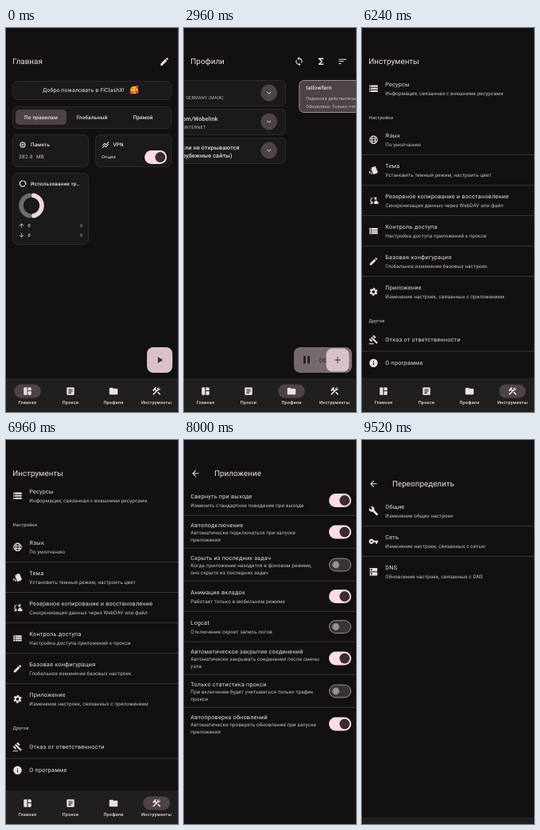
An HTML page that plays this animation: 216x480 px, repeating every 9600 ms.

```html
<!DOCTYPE html>
<html lang="ru">
<head>
<meta charset="utf-8">
<style>
html, body { margin: 0; width: 100%; height: 100%; overflow: hidden; background: #121011 }
svg { display: block; width: 100vw; height: 100vh }
text { font-family: Roboto, "Noto Sans", sans-serif; white-space: pre; text-rendering: geometricPrecision }
path { fill-rule: evenodd }
</style>
</head>
<body>
<svg id="stage" viewBox="0 0 216 480"></svg>
<script>
const BG = '#121011', INK = '#ece0e1', PINK = '#fbdde2', FAB = '#d9c2c7', DARK = '#3b2c30', PILL = '#4e4346';

// Icons on a 24 x 24 grid
const ICON = {
  edit: 'M3 17.25V21h3.75L17.81 9.94l-3.75-3.75zM20.71 7.04a1 1 0 0 0 0-1.41l-2.34-2.34a1 1 0 0 0-1.41 0l-1.83 1.83 3.75 3.75z',
  sync: 'M12 4V1L8 5l4 4V6c3.3 0 6 2.7 6 6 0 1-.25 2-.7 2.8l1.46 1.46A8 8 0 0 0 12 4zm0 14c-3.3 0-6-2.7-6-6 0-1 .25-2 .7-2.8L5.24 7.74A8 8 0 0 0 12 20v3l4-4-4-4z',
  sum: 'M18 4H6v2l6.5 6L6 18v2h12v-3h-7l5-5-5-5h7z',
  sort: 'M3 18h6v-2H3zM3 6v2h18V6zm0 7h12v-2H3z',
  home: 'M11 21H5a2 2 0 0 1-2-2V5a2 2 0 0 1 2-2h6zM13 21h6a2 2 0 0 0 2-2v-7h-8zM21 10V5a2 2 0 0 0-2-2h-6v7z',
  article: 'M19 3H5a2 2 0 0 0-2 2v14a2 2 0 0 0 2 2h14a2 2 0 0 0 2-2V5a2 2 0 0 0-2-2zm-5 14H7v-2h7zm3-4H7v-2h10zm0-4H7V7h10z',
  folder: 'M10 4H4a2 2 0 0 0-2 2v12a2 2 0 0 0 2 2h16a2 2 0 0 0 2-2V8a2 2 0 0 0-2-2h-8z',
  tools: 'M13.78 15.17l2.12-2.12 5.99 5.99-2.12 2.12zM17.5 10A3.5 3.5 0 0 0 20.6 4.9l-2.7 2.7-1.5-1.5 2.7-2.7A3.5 3.5 0 0 0 14.2 7.66l-1.85 1.85-1.78-1.78.71-.71-1.41-1.41L12 3.49a3 3 0 0 0-4.24 0L4.22 7.03l1.41 1.41H2.81l-.71.71 3.54 3.54.71-.71V9.15l1.41 1.41.71-.71 1.78 1.78-7.41 7.41 2.12 2.12L16.34 9.79c.36.13.75.21 1.16.21z',
  storage: 'M2 20h20v-4H2zm2-3h2v2H4zM2 4v4h20V4zm4 3H4V5h2zm-4 7h20v-4H2zm2-3h2v2H4z',
  cards: 'M2.5 19.65l1.4.56v-9l-2.5 5.83a2 2 0 0 0 1.1 2.6zM22 15.95L17.07 4a2 2 0 0 0-2.6-1.1L7.1 5.95a2 2 0 0 0-1.08 2.6l4.96 11.97a2 2 0 0 0 2.6 1.08l7.36-3.05a2 2 0 0 0 1.09-2.6zM7.88 8.75a1 1 0 1 1 0-2 1 1 0 0 1 0 2zm-2 11a2 2 0 0 0 2 2h1.45l-3.45-8.34z',
  cloud: 'M21.5 15A3.5 3.5 0 0 0 14.7 14.25 3 3 0 0 0 14.9 20h6.6a2.5 2.5 0 0 0 0-5zM10 4.26v2.1A6 6 0 0 0 8 16.44V14h2v6H4v-2h2.73A8 8 0 0 1 10 4.26zM20 6h-2.73a8 8 0 0 1 2.66 5h-2A6 6 0 0 0 16 7.56V10h-2V4h6z',
  list: 'M2 14h4v-4H2zm0 5h4v-4H2zM2 9h4V5H2zm5 5h15v-4H7zm0 5h15v-4H7zM7 5v4h15V5z',
  gavel: 'M1 21h12v2H1zM5.24 8.07l2.83-2.83 14.14 14.14-2.83 2.83zM12.32 1l5.66 5.66-2.83 2.83-5.66-5.66zM3.83 9.48l5.66 5.66-2.83 2.83L1 12.31z',
  info: 'M12 2a10 10 0 1 0 0 20 10 10 0 0 0 0-20zm1 15h-2v-6h2zm0-8h-2V7h2z',
  wrench: 'M22.7 19l-9.1-9.1c.9-2.3.4-5-1.5-6.9-2-2-5-2.4-7.4-1.3L9 6 6 9 1.6 4.7C.4 7.1.9 10.1 2.9 12.1c1.9 1.9 4.6 2.4 6.9 1.5l9.1 9.1c.4.4 1 .4 1.4 0l2.3-2.3c.5-.4.5-1.1.1-1.4z',
  key: 'M12.65 10a6 6 0 1 0 0 4H17v4h4v-4h2v-4zM7 14a2 2 0 1 1 0-4 2 2 0 0 1 0 4z',
  dns: 'M3 13h18v8H3zM7 19a2 2 0 1 1 0-4 2 2 0 0 1 0 4zM3 3h18v8H3zM7 9a2 2 0 1 1 0-4 2 2 0 0 1 0 4z',
  back: 'M20 11H7.83l5.59-5.59L12 4l-8 8 8 8 1.41-1.41L7.83 13H20z',
  chip: 'M15 9H9v6h6zm-2 4h-2v-2h2zm8-2V9h-2V7a2 2 0 0 0-2-2h-2V3h-2v2h-2V3H9v2H7a2 2 0 0 0-2 2v2H3v2h2v2H3v2h2v2a2 2 0 0 0 2 2h2v2h2v-2h2v2h2v-2h2a2 2 0 0 0 2-2v-2h2v-2h-2v-2zm-4 6H7V7h10z',
  chart: 'M2 20l7.5-7.5 4 4 7.1-8L22 9.9l-8.5 9.6-4-4-6 6zM3.5 15.5l6-6 4 4L22 3.9l-1.4-1.4-7.1 8-4-4L2 14z',
  usage: 'M13 2v3.1a7 7 0 0 1 5.5 9.5l2.6 1.5A10 10 0 0 0 13 2zM12 19a7 7 0 0 1-1-13.9V2a10 10 0 1 0 9.1 15.9l-2.6-1.5A7 7 0 0 1 12 19z',
  play: 'M8 5v14l11-7z',
  plus: 'M19 13h-6v6h-2v-6H5v-2h6V5h2v6h6z',
  dots: 'M10 4h4v4h-4zM10 10h4v4h-4zM10 16h4v4h-4z',
  up: 'M11 20V7.8l-5.6 5.6L4 12l8-8 8 8-1.4 1.4L13 7.8V20z',
  down: 'M13 4v12.2l5.6-5.6L20 12l-8 8-8-8 1.4-1.4 5.6 5.6V4z'
};
const DRAWN = {
  globe: '<g fill="none" stroke="#ece0e1" stroke-width="2"><circle cx="12" cy="12" r="9"/><ellipse cx="12" cy="12" rx="4" ry="9"/><path d="M4 9h16M4 15h16"/></g>',
  gear: '<g fill="none" stroke="#ece0e1"><circle cx="12" cy="12" r="5.4" stroke-width="3.8"/><circle cx="12" cy="12" r="8.2" stroke-width="3" stroke-dasharray="4.4 4.19" stroke-dashoffset="-2.1"/></g>'
};

// Markup helpers; y is the middle of the shape or text
const icon = (name, x, y, size = 12.6, fill = INK) =>
  `<g transform="translate(${x} ${y}) scale(${size / 24}) translate(-12 -12)">${DRAWN[name] || `<path d="${ICON[name]}" fill="${fill}"/>`}</g>`;
const text = (x, y, size, str, opt = '', gap = .02) =>
  `<text x="${x}" y="${y + size * .35}" font-size="${size}" letter-spacing="${gap * size}" fill="${INK}" ${opt}>${str}</text>`;
const rect = (x, y, w, h, r, fill, opt = '') =>
  `<rect x="${x}" y="${y}" width="${w}" height="${h}" rx="${r}" fill="${fill}" ${opt}/>`;
const circle = (x, y, r, fill, opt = '') => `<circle cx="${x}" cy="${y}" r="${r}" fill="${fill}" ${opt}/>`;
const group = (id, body, opt = '') => `<g id="${id}" ${opt}>${body}</g>`;
const card = (y, h, x = 8.5, w = 199) => rect(x, y + .5, w, h - 1, 6, '#1b191a', 'stroke="#343032" stroke-width=".8"');
const line = y => rect(0, y - .9, 216, .8, 0, '#433d3f');
const MID = 'text-anchor="middle"', END = 'text-anchor="end"', BOLD = 'font-weight="500"';
const heading = (x, str) => text(x, 41.5, 9.9, str, '', 0);
const title = (x, y, str) => text(x, y, 7.25, str, '', .03);
const sub = (x, y, str) => text(x, y, 6.3, str, 'fill-opacity=".85"', .017);
const toggle = (x, y, on) => on
  ? rect(x - 14, y - 8.4, 28, 16.8, 8.4, PINK) + circle(x + 5.7, y, 6.4, DARK)
  : rect(x - 13.5, y - 7.9, 27, 15.8, 7.9, '#383335', 'stroke="#9a8f91"') + circle(x - 5.3, y, 4.4, '#9a8f91');

const heart = (x, y) => `<path transform="translate(${x} ${y})" d="M0 2C-4 -1-1-3 0-1 1-3 4-1 0 2z" fill="#e8354a"/>`;
const smiley = circle(161, 77.5, 4.8, '#f9b93a') +
  '<path d="M157.8 76.6q1-1.4 2 0M162 76.6q1-1.4 2 0M158.6 79q2.4 2.6 4.8 0" fill="none" stroke="#5c3518" stroke-width=".8"/>' +
  heart(157.2, 81) + heart(164.8, 80.4) + heart(164.6, 73.6);

const arc = (x, y, r, from, sweep) => {
  const at = a => `${x + r * Math.cos(a)} ${y + r * Math.sin(a)}`;
  return `M${at(from)}A${r} ${r} 0 ${sweep > Math.PI ? 1 : 0} 1 ${at(from + sweep)}`;
};
const ring = (from, color) =>
  `<path d="${arc(32, 222, 13, from, 2.75)}" fill="none" stroke="${color}" stroke-width="5.6" stroke-linecap="round"/>`;
const traffic = (y, dir) => icon(dir, 19.5, y, 8) + text(27.5, y, 5.6, '0', BOLD) + text(96.5, y, 5.6, 'B', END + ' fill-opacity=".6"');

const home = card(66, 24) + text(46, 77.5, 7, 'Добро пожаловать в FlClashX!', '', .015) + smiley +
  card(98, 28) + rect(12, 102, 64, 19, 5, PILL) +
  [['По правилам', 44], ['Глобальный', 108], ['Прямой', 172]].map(([s, x]) => text(x, 111.5, 6.5, s, `${MID} ${BOLD}`)).join('') +
  card(133, 41, 8.5, 95) + icon('chip', 21, 146, 10.5) + text(31, 146, 6.4, 'Память', BOLD) + text(16, 160.5, 6.4, '382.8  MB', 'fill-opacity=".85"', .06) +
  card(133, 41, 112.5, 95) + icon('chart', 125, 146, 10.5) + text(134.5, 146, 6.4, 'VPN', BOLD) + text(120, 161.5, 5.6, 'Опции', '', .035) + toggle(188, 161.5, true) +
  card(181, 90, 8.5, 95) + icon('usage', 21, 194.5, 10.5) + text(31, 194.5, 6.4, 'Использование тр…', BOLD) +
  ring(-1.38, '#f0d8dd') + ring(1.76, '#6f6a6b') + traffic(247, 'up') + traffic(259, 'down');

const chevron = y => circle(186.5, y, 10.4, PILL) +
  `<path d="M184.2 ${y - 1.1}l2.3 2.3 2.3-2.3" fill="none" stroke="${INK}"/>`;
const right = (x, y, str) => text(x, y, 7.2, str, `${END} ${BOLD}`);
const small = (x, y, str) => text(x, y, 5.5, str, `${END} fill-opacity=".8"`, .035);
const proxies = [65, 101, 137].map(y => card(y, 33) + chevron(y + 16)).join('') +
  right(45, 77, 'Прокси') + small(129.5, 87, 'Selector  GERMANY (MAIN)') +
  right(122.5, 113, 'Chatroom/Wobelink') + small(107, 124, 'Selector  INTERNET') +
  right(149.5, 149, 'Режим (если не открываются') + right(140.5, 159.5, 'некоторые зарубежные сайты)');

const profiles = rect(8.5, 65.5, 199, 40, 6, PILL, 'stroke="#a69799" stroke-width=".9"') +
  text(17, 74.5, 6.9, 'tallowfern', BOLD) +
  text(17, 88, 5.4, 'Подписка действительна до: 05.08.2025', 'fill-opacity=".85"', .035) +
  text(17, 97.8, 5.4, '', 'id="updated" fill-opacity=".85"', .035) +
  group('more', icon('dots', 188.5, 86)) +
  '<path id="spin" fill="none" stroke="#f2dce0" stroke-width="2.4"/>';

const row = (y, pic, name, note) => icon(pic, 14.5, y + 18.8, 12.6) + title(29.3, y + 13.7, name) + sub(29.3, y + 24.9, note);
const label = (y, str) => text(8.5, y, 5.8, str, 'fill-opacity=".75" ' + BOLD, .02);
const rows = (top, list) => list.map((r, i) => row(top + 38 * i, ...r) + (i ? line(top + 38 * i) : '')).join('');
const toolList = label(-34, 'Ещё') +
  rows(-25, [
    ['article', 'Запросы', 'Просмотр последних записей запросов'],
    ['list', 'Соединения', 'Просмотр текущих данных о соединениях'],
    ['storage', 'Ресурсы', 'Информация, связанная с внешними ресурсами']]) +
  label(106, 'Настройки') +
  rows(115, [
    ['globe', 'Язык', 'По умолчанию'],
    ['cards', 'Тема', 'Установить темный режим, настроить цвет'],
    ['cloud', 'Резервное копирование и восстановление', 'Синхронизация данных через WebDAV или файл'],
    ['list', 'Контроль доступа', 'Настройка доступа приложений к прокси'],
    ['edit', 'Базовая конфигурация', 'Глобальное изменение базовых настроек'],
    ['gear', 'Приложение', 'Изменение настроек, связанных с приложением']]) +
  label(360, 'Другое') +
  icon('gavel', 14.5, 383.5) + title(29.3, 383.5, 'Отказ от ответственности') + line(398.5) +
  icon('info', 14.5, 412.8) + title(29.3, 412.8, 'О программе');

const options = [
  [1, 'Свернуть при выходе', 'Изменить стандартное поведение при выходе'],
  [1, 'Автоподключение', 'Автоматически подключаться при запуске', 'приложения'],
  [0, 'Скрыть из последних задач', 'Когда приложение находится в фоновом режиме,', 'оно скрыто из последних задач'],
  [1, 'Анимация вкладок', 'Работает только в мобильном режиме'],
  [0, 'Logcat', 'Отключение скроет запись логов'],
  [1, 'Автоматическое закрытие соединений', 'Автоматически закрывать соединения после смены', 'узла'],
  [0, 'Только статистика прокси', 'При включении будет учитываться только трафик', 'прокси'],
  [1, 'Автопроверка обновлений', 'Автоматически проверять обновления при запуске', 'приложения']];
let optionTop = 56.7;
const optionList = options.map(([on, name, a, b], i) => {
  const y = optionTop, h = b ? 41 : 38;
  optionTop += h;
  return (i ? line(y) : '') + title(8.3, y + (b ? 11.3 : 14), name) +
    sub(8.3, y + (b ? 20.7 : 25.3), a) + (b ? sub(8.3, y + 30.1, b) : '') + toggle(196, y + h / 2 - .2, on);
}).join('');

const subpage = (id, name, body) =>
  `<clipPath id="${id}Clip"><rect id="${id}Box" width="216"/></clipPath>` +
  group(id, rect(0, 0, 216, 480, 0, BG) + group(id + 'Body', icon('back', 14.5, 41.8) + heading(38, name) + body), `clip-path="url(#${id}Clip)"`);

const tabs = [['home', 'Главная'], ['article', 'Прокси'], ['folder', 'Профили'], ['tools', 'Инструменты']];
const nav = rect(0, 438, 216, 42, 0, '#211e20') + tabs.map(([pic, name], i) => {
  const x = 27 + 54 * i;
  return group('pill' + i, rect(-16.8, -8.4, 33.6, 16.8, 8.4, PILL)) + icon(pic, x, 454, 12.6) +
    text(x, 468, 5.5, name, `${MID} ${BOLD}`, .04);
}).join('');

const stage = document.getElementById('stage');
stage.innerHTML = rect(0, 0, 216, 480, 0, BG) +
  '<clipPath id="body"><rect y="58" width="216" height="380"/></clipPath><g clip-path="url(#body)">' +
  group('pages', [home, proxies, profiles, group('toolList', toolList)].map((p, i) => `<g transform="translate(${216 * i})">${p}</g>`).join('')) + '</g>' +
  tabs.map(([, name], i) => group('head' + i, heading(8.3, name) +
    (i == 0 ? icon('edit', 199, 42, 13) : i == 2 ? icon('sync', 144.5, 41.8) + icon('sum', 172, 41.8) + icon('sort', 199, 41.8) : ''))).join('') +
  circle(144.5, 42, 9.5, INK, 'id="ripple"') +
  group('runFab', rect(0, 399, 32, 32, 8, FAB, 'id="runBox"') +
    group('playIcon', icon('play', 193, 415, 14, DARK)) +
    group('runInfo', rect(150, 410, 2.8, 9.5, .3, DARK) + rect(155.2, 410, 2.8, 9.5, .3, DARK) +
      text(170, 415, 7.5, '', `id="clock" style="fill:${DARK}"`, .067))) +
  group('addFab', rect(-14.4, -14.4, 28.8, 28.8, 7.5, FAB) + icon('plus', 0, 0, 12.6, DARK)) +
  nav + subpage('app', 'Приложение', optionList) +
  subpage('override', 'Переопределить', rows(57, [
    ['wrench', 'Общие', 'Изменение общих настроек'],
    ['key', 'Сеть', 'Изменение настроек, связанных с сетью'],
    ['dns', 'DNS', 'Обновление настроек, связанных с DNS']]));

const $ = id => document.getElementById(id);
const set = (id, attrs) => { for (const k in attrs) $(id).setAttribute(k, attrs[k]); };
const show = (id, on) => set(id, { opacity: +on });
const span = (t, start, len) => Math.min(1, Math.max(0, (t - start) / len));
const bezier = (x1, y1, x2, y2) => x => {
  const f = (a, b, u) => 3 * a * u * (1 - u) ** 2 + 3 * b * u * u * (1 - u) + u ** 3;
  let lo = 0, hi = 1;
  for (let i = 0; i < 24; i++) {
    const m = (lo + hi) / 2;
    if (f(x1, x2, m) < x) lo = m; else hi = m;
  }
  return f(y1, y2, lo);
};
const easeOut = bezier(0, 0, .58, 1), fastSlow = bezier(.4, 0, .2, 1);

// Grows a list row into a full page
function expand(id, rowTop, rowEnd, p, fade) {
  const y = rowTop * (1 - p);
  set(id, { visibility: p > 0 ? 'visible' : 'hidden', opacity: fade });
  set(id + 'Box', { y, height: rowEnd + (480 - rowEnd) * p - y });
  set(id + 'Body', { transform: `translate(0 ${y})` });
}

function draw(t) {
  const pos = 2 * easeOut(span(t, 2811, 300)) + easeOut(span(t, 5530, 300));
  set('pages', { transform: `translate(${-216 * pos})` });
  const scroll = 1 - (1 - span(t, 5960, 450)) ** 3;
  set('toolList', { transform: `translate(0 ${112 * (1 - scroll)})` });

  const tab = t < 2720 ? 0 : t < 5440 ? 2 : 3;
  const grow = fastSlow(span(t, tab == 0 ? -999 : tab == 2 ? 2720 : 5440, 220));
  tabs.forEach((_, i) => {
    show('head' + i, i == tab);
    set('pill' + i, { transform: `translate(${27 + 54 * i} 454) scale(${i == tab ? grow : 0} 1)` });
  });

  const wide = fastSlow(span(t, 1000, 400));
  set('runBox', { x: 177 - 39 * wide, width: 32 + 41 * wide });
  show('playIcon', 1 - span(wide, 0, .4));
  show('runInfo', span(wide, .6, .4));
  $('clock').textContent = t < 1840 ? '00:00:00' : '00:00:01';
  show('runFab', 1 - span(t, 2811, 300));
  const add = fastSlow(span(t, 2790, 150)) * (1 - span(t, 5500, 200));
  set('addFab', { transform: `translate(193 415) scale(${add})` });

  const busy = t >= 4240 && t < 5240, s = t - 4240;
  $('updated').textContent = 'Обновлено: ' + (busy ? '6 Минут назад' : 'Только что');
  show('more', !busy);
  show('spin', busy);
  if (busy) {
    const u = s / 1333, head = fastSlow(span(u, 0, .5)), tail = fastSlow(span(u, .5, .5));
    const from = Math.PI * (-.5 + 1.5 * tail + 2 * s / 2222 + .5 * u);
    set('spin', { d: arc(188.5, 86, 6.5, from, Math.max(.01, 1.5 * Math.PI * (head - tail))) });
  }
  show('ripple', .12 * Math.sin(Math.PI * span(t, 4200, 400)));

  const open = span(t, 7370, 300), close = span(t, 8650, 300), next = span(t, 9302, 300);
  expand('app', 305, 343, fastSlow(open) - fastSlow(close), span(open, .2, .2) * (1 - span(close, .6, .2)));
  expand('override', 267, 305, fastSlow(next), span(next, .2, .2));
}

const start = performance.now();
function tick() {
  draw((performance.now() - start) % 9600);
  requestAnimationFrame(tick);
}
tick();
</script>
</body>
</html>
```
